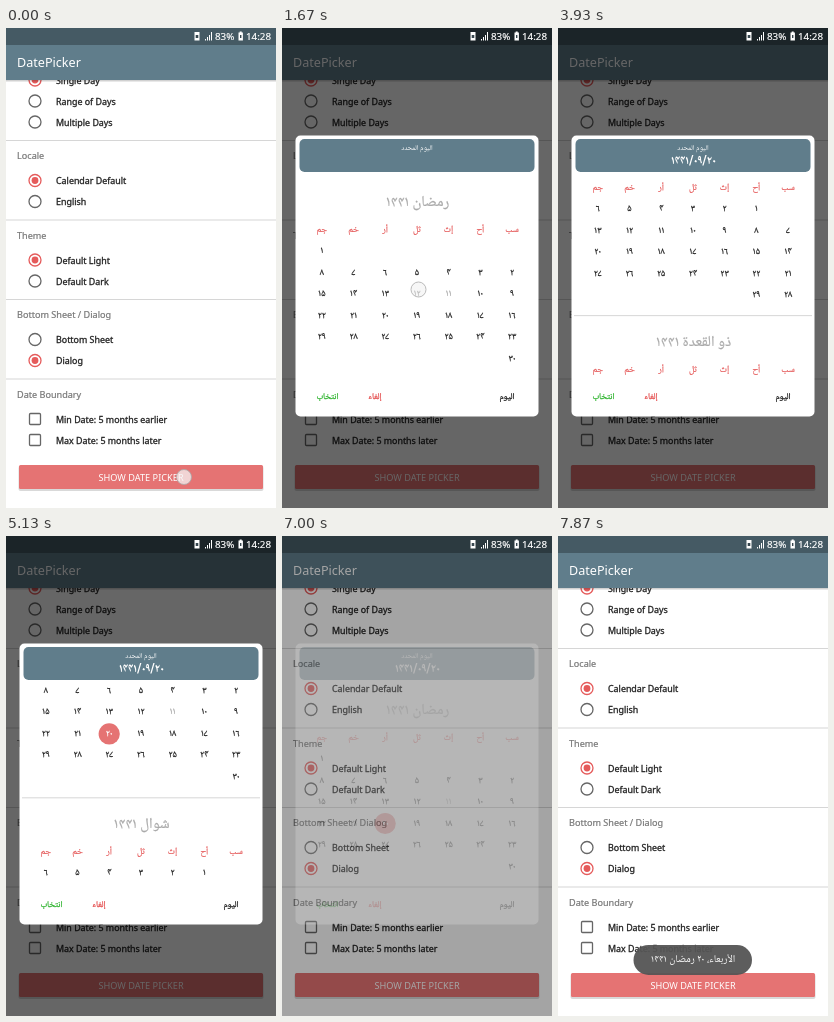
Recreate the animation shown at these times as an HTML page. Size 270x480 px, loop 8000 ms.

```html
<!DOCTYPE html>
<html lang="en">
<head>
<meta charset="utf-8">
<title>Date picker</title>
<style>
  html, body { margin: 0; width: 100%; height: 100%; overflow: hidden; background: #fff; }
  svg { display: block; width: 100vw; height: 100vh; }
  text { font: 9.2px "Noto Sans", "Open Sans", sans-serif; dominant-baseline: central; }
  .ar { font-family: "Noto Naskh Arabic", "DejaVu Sans", sans-serif; text-anchor: middle; direction: rtl; }
  .option { font-size: 8.9px; fill: #222; stroke: #222; stroke-width: .3; }
  .section { font-size: 9.1px; fill: #777; stroke: #777; stroke-width: .2; }
  .title { font-size: 15px; fill: #aaa; stroke: #aaa; stroke-width: .2; }
  .weekday { fill: #e55b5b; stroke: #e55b5b; stroke-width: .2; }
  .day { font-size: 9.6px; stroke: currentColor; stroke-width: .25; fill: currentColor; }
  .action { font-size: 8.6px; stroke: currentColor; stroke-width: .3; fill: currentColor; }
  .status { font-size: 9.8px; stroke: #fff; stroke-width: .2; }
</style>
</head>
<body>
<svg viewBox="0 0 270 480">
  <defs>
    <clipPath id="page"><rect y="52" width="270" height="428"/></clipPath>
    <clipPath id="list"><rect x="14" y="146" width="242" height="205"/></clipPath>
  </defs>
  <rect width="270" height="480" fill="#fff"/>
  <g id="form" clip-path="url(#page)"></g>
  <rect x="12.5" y="438" width="245" height="25" rx="2" fill="#000" opacity=".15"/>
  <rect x="13" y="437" width="244" height="24" rx="1.5" fill="#e57373"/>
  <rect id="ripple" x="13" y="437" width="244" height="24" rx="1.5" fill="#fff"/>
  <text x="135" y="449" text-anchor="middle" fill="#fff">SHOW DATE PICKER</text>
  <rect y="52" width="270" height="1.5" fill="#000" opacity=".18"/>
  <rect y="17" width="270" height="35" fill="#607d8b"/>
  <rect width="270" height="17" fill="#455a64"/>
  <text x="11" y="34.5" fill="#fff" style="font-size:12.6px">DatePicker</text>
  <rect id="dim" width="270" height="480"/>
  <g fill="#fff">
    <path d="M188.500 4h5v8.500h-5zM199 11h1v1.500h-1zM201 9h1v3.500h-1zM203 7h1v5.500h-1zM205 4h1v8.500h-1zM232.500 4.500h1.200v-1h2v1h1.200v8h-4.400z"/>
    <path d="M189.700 7h2.600v3h-2.600zM234 7h1.400v3h-1.400z" fill="#37474f"/>
    <text class="status" x="209" y="8.500">83%</text>
    <text class="status" x="265" y="8.500" text-anchor="end">14:28</text>
  </g>
  <g id="dialog" lang="fa">
    <rect x="13.500" y="107.500" width="243" height="281" rx="5" fill="#fff"/>
    <g clip-path="url(#list)"><g id="months"></g></g>
    <rect x="17.500" y="111" width="235" height="33" rx="5" fill="#607d8b"/>
    <text class="ar" x="135" y="120" fill="#fff" style="font-size:7.200px">اليوم المحدد</text>
    <text class="ar" id="chosen" x="135.500" y="133.500" fill="#fff" style="font-size:12px;font-weight:600"></text>
    <text class="ar action" x="45.500" y="369" color="#33b533">انتخاب</text>
    <text class="ar action" x="93" y="369" color="#e55353">إلغاء</text>
    <text class="ar action" x="225" y="369" color="#222">اليوم</text>
  </g>
  <g id="toast" lang="fa">
    <rect x="75.500" y="409" width="118.500" height="30" rx="15" fill="#555" opacity=".95"/>
    <text class="ar" x="135" y="423.500" fill="#fff" style="font-size:10.400px">الأربعاء، ۲۰ رمضان ۱۴۴۱</text>
  </g>
  <circle id="touch" r="7.500" fill="#f4f4f4" fill-opacity=".75" stroke="#aaa" stroke-width=".8"/>
</svg>
<script>
const $ = id => document.getElementById(id);
const RED = '#e55b5b';

function add(parent, tag, attrs, text = '') {
  const el = document.createElementNS('http://www.w3.org/2000/svg', tag);
  for (const key in attrs) el.setAttribute(key, attrs[key]);
  el.textContent = text;
  return parent.appendChild(el);
}
const digits = value => String(value).replace(/\d/g, d => String.fromCharCode(0x6f0 + +d));

// Settings form
const form = $('form');
function option(y, label, checked) {
  add(form, 'circle', { cx: 29, cy: y, r: 6, fill: 'none', stroke: checked ? RED : '#666', 'stroke-width': 1.3 });
  if (checked) add(form, 'circle', { cx: 29, cy: y, r: 3.4, fill: RED });
  add(form, 'text', { x: 50, y, class: 'option' }, label);
}
function section(y, label) {
  add(form, 'rect', { y: y - 15.5, width: 270, height: 1, fill: '#d6d6d6' });
  add(form, 'text', { x: 11, y, class: 'section' }, label);
}
function checkbox(y, label) {
  add(form, 'rect', { x: 23.5, y: y - 5.5, width: 11, height: 11, rx: 1, fill: 'none', stroke: '#666', 'stroke-width': 1.3 });
  add(form, 'text', { x: 50, y, class: 'option' }, label);
}
option(52, 'Single Day', true);
option(73, 'Range of Days');
option(94, 'Multiple Days');
section(127.5, 'Locale');
option(152.5, 'Calendar Default', true);
option(173.5, 'English');
section(207, 'Theme');
option(232, 'Default Light', true);
option(253, 'Default Dark');
section(286.5, 'Bottom Sheet / Dialog');
option(311.5, 'Bottom Sheet');
option(332.5, 'Dialog', true);
section(366, 'Date Boundary');
checkbox(391, 'Min Date: 5 months earlier');
checkbox(412, 'Max Date: 5 months later');

// Calendar months, week columns running right to left
const ROW = 21.5, columnX = i => 230 - i * 31.7;
const months = $('months');
const marker = add(months, 'circle', { r: 10.6, fill: '#e57373' });
const dayCells = {};
function month(y, name, start, length, today) {
  if (y > 200) add(months, 'rect', { x: 16, y: y - 28, width: 238, height: .8, fill: '#ccc' });
  add(months, 'text', { class: 'ar title', x: 135.5, y }, `${name} ${digits(1441)}`);
  ['سب', 'أح', 'إث', 'ثل', 'أر', 'خم', 'جم'].forEach((day, i) =>
    add(months, 'text', { class: 'ar weekday', x: columnX(i), y: y + 27 }, day));
  for (let day = 1; day <= length; day++) {
    const slot = start + day - 1, x = columnX(slot % 7), cy = y + 48 + Math.floor(slot / 7) * ROW;
    const el = add(months, 'text', { class: 'ar day', x, y: cy, color: day === today ? '#aaa' : '#222' }, digits(day));
    if (today) dayCells[day] = { x, y: cy, el };
  }
}
month(175, 'رمضان', 6, 30, 11);
month(379, 'شوال', 1, 29);
month(561, 'ذو القعدة', 2, 30);

// Timeline
const ramp = (t, a, b) => Math.min(1, Math.max(0, (t - a) / (b - a)));
const easeOut = (p, power) => 1 - (1 - p) ** power;
const taps = [
  { x: 178, y: 449, from: -100, to: 200 },
  { x: 136.5, y: 261.5, from: 1600, to: 1880 },
  { x: 103.5, y: 287, from: 2500, to: 2750 },
  { x: 45, y: 369, from: 6770, to: 6860 }
];
const LOOP = 8000;

function render(t) {
  $('ripple').setAttribute('opacity', .16 * Math.sin(Math.PI * ramp(t, 70, 330)));
  $('dim').setAttribute('opacity', .6 * (ramp(t, 470, 675) - ramp(t, 6920, 7120)));
  $('dialog').setAttribute('opacity', ramp(t, 450, 590) - ramp(t, 6850, 7040));
  $('toast').setAttribute('opacity', ramp(t, 7250, 7580));

  const scroll = 247 * (easeOut(ramp(t, 3270, 4070), 3) - easeOut(ramp(t, 4800, 5600), 1.9));
  months.setAttribute('transform', `translate(0 ${-scroll})`);

  const day = t < 1800 ? 0 : t < 2670 ? 12 : 20;
  for (const n of [12, 20]) dayCells[n].el.setAttribute('color', n === day ? '#fff' : '#222');
  marker.setAttribute('visibility', day ? 'visible' : 'hidden');
  if (day) {
    marker.setAttribute('cx', dayCells[day].x);
    marker.setAttribute('cy', dayCells[day].y);
  }
  $('chosen').textContent = day ? digits(`1441/09/${day}`) : '';

  const tap = taps.find(p => t >= p.from && t < p.to + 130);
  $('touch').setAttribute('opacity', tap ? ramp(t, tap.from, tap.from + 70) - ramp(t, tap.to, tap.to + 130) : 0);
  if (tap) $('touch').setAttribute('transform', `translate(${tap.x} ${tap.y})`);
}

const begin = performance.now();
function tick() {
  render((performance.now() - begin) % LOOP);
  requestAnimationFrame(tick);
}
tick();
</script>
</body>
</html>
```
